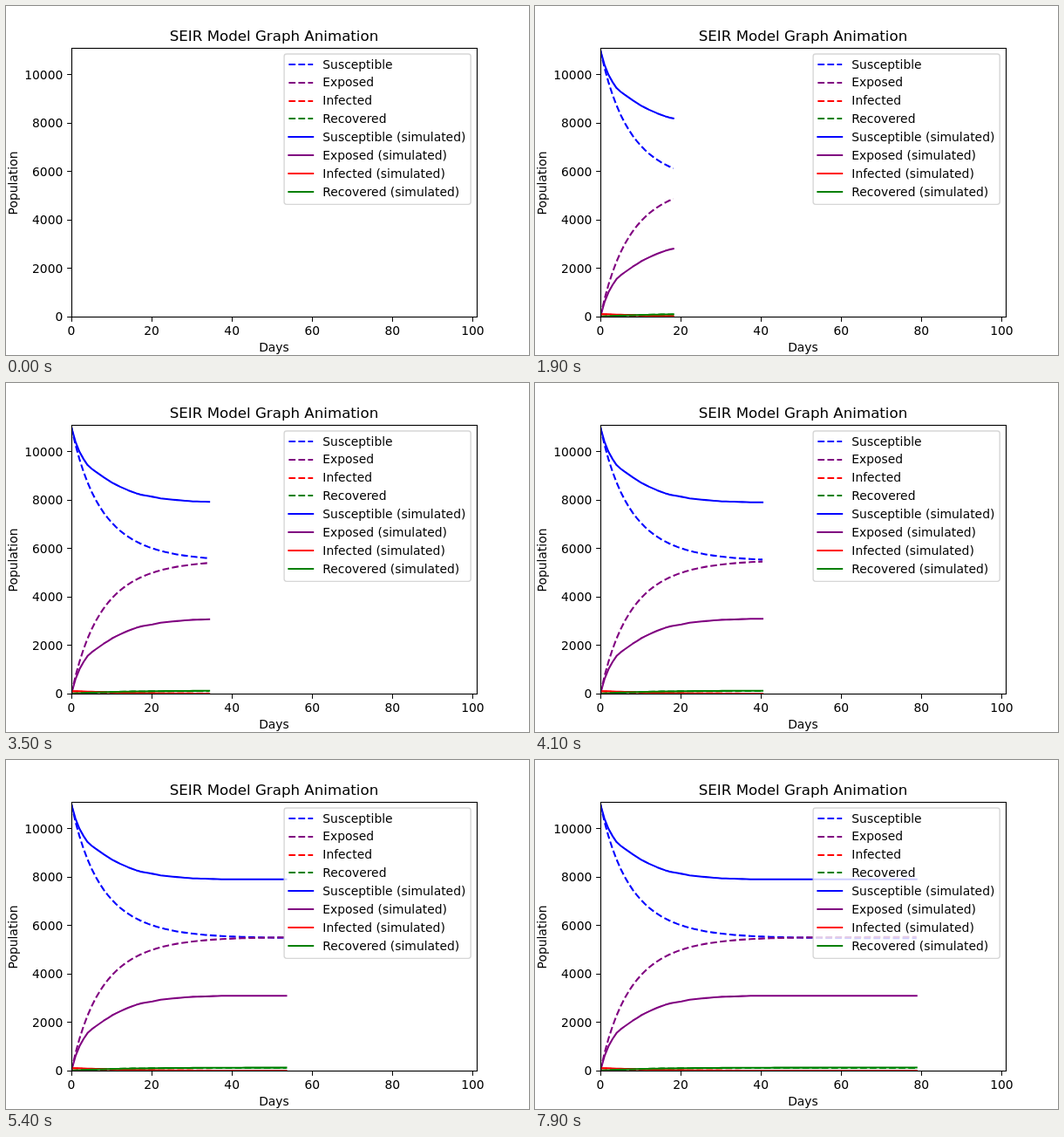
Recreate the animation shown at these times as an HTML page with a canvas. Size 600 px wide and 400 px high, loop 8000 ms.

```html
<!DOCTYPE html>
<html lang="en">
<head>
<meta charset="utf-8">
<title>SEIR Model Graph Animation</title>
<style>
  html, body { margin: 0; width: 100%; height: 100%; overflow: hidden; background: #fff; }
  canvas { display: block; width: 600px; height: 400px; }
</style>
</head>
<body>
<canvas id="stage" width="600" height="400"></canvas>
<script>
const ctx = document.getElementById('stage').getContext('2d');

const LOOP = 8000, STEP = 100;
const DAYS = 101, PEOPLE = 11100;
const POINT = 100 / 99; // 100 samples spread over 100 days
const BOX = { left: 75, top: 48, right: 540, bottom: 356 };
const FONT = '"DejaVu Sans", sans-serif';
const DASH = [7.708, 3.333];
const LINE = 2.083;

const xOf = day => BOX.left + day * (BOX.right - BOX.left) / DAYS;
const yOf = count => BOX.bottom - count * (BOX.bottom - BOX.top) / PEOPLE;

// Simulated loss of susceptibles: [day, people]
const LOSS = [
  [0, 0], [1, 590], [2, 1010], [3, 1310], [4, 1560], [5, 1710], [6, 1835],
  [8, 2070], [10, 2285], [12, 2455], [14, 2600], [16, 2725], [17, 2778],
  [18, 2810], [20, 2868], [22, 2935], [25, 2990], [27, 3020], [30, 3060],
  [34, 3078], [37, 3098], [99, 3100]
];

function lossAt(i) {
  const k = LOSS.findIndex(p => p[0] >= i);
  if (k === 0) return 0;
  const [i0, v0] = LOSS[k - 1], [i1, v1] = LOSS[k];
  return v0 + (v1 - v0) * (i - i0) / (i1 - i0);
}

const healed = day => 1 - Math.exp(-0.1 * day);
const susceptible = day => 11000 * Math.exp(-0.699 * healed(day));

const series = [
  { name: 'Susceptible', color: '#0000ff', dash: DASH, value: susceptible },
  { name: 'Exposed', color: '#800080', dash: DASH,
    value: d => 11000 - susceptible(d) - 10 * healed(d) },
  { name: 'Infected', color: '#ff0000', dash: DASH, value: d => 100 * (1 - healed(d)) },
  { name: 'Recovered', color: '#008000', dash: DASH, value: d => 110 * healed(d) },
  { name: 'Susceptible (simulated)', color: '#0000ff', dash: [],
    value: (d, i) => 11000 - lossAt(i) },
  { name: 'Exposed (simulated)', color: '#800080', dash: [],
    value: (d, i) => lossAt(i) * 0.997 },
  { name: 'Infected (simulated)', color: '#ff0000', dash: [],
    value: d => 100 * Math.exp(-Math.pow(d / 13, 1.5)) },
  { name: 'Recovered (simulated)', color: '#008000', dash: [],
    value: d => 125 * (1 - Math.exp(-0.075 * d)) }
];

function text(str, x, y, size = 13.889, align = 'center') {
  ctx.font = `${size}px ${FONT}`;
  ctx.textAlign = align;
  ctx.fillStyle = '#000';
  ctx.fillText(str, x, y);
}

function setPen(s, width) {
  ctx.strokeStyle = s.color;
  ctx.lineWidth = width;
  ctx.lineJoin = 'round';
  ctx.lineCap = s.dash.length ? 'butt' : 'square';
  ctx.setLineDash(s.dash);
}

function drawCurves(last) {
  if (last < 1) return;
  ctx.save();
  ctx.beginPath();
  ctx.rect(BOX.left, BOX.top, BOX.right - BOX.left, BOX.bottom - BOX.top);
  ctx.clip();
  for (const s of series) {
    setPen(s, LINE);
    ctx.beginPath();
    for (let i = 0; i <= last; i++) {
      const day = i * POINT;
      ctx.lineTo(xOf(day), yOf(s.value(day, i)));
    }
    ctx.stroke();
  }
  ctx.restore();
}

function drawAxes() {
  const { left, top, right, bottom } = BOX;
  ctx.fillStyle = '#000';
  for (let d = 0; d <= 100; d += 20) ctx.fillRect(Math.floor(xOf(d)), bottom + 1, 1, 4.86);
  for (let p = 0; p <= 10000; p += 2000) ctx.fillRect(left - 4.86, Math.floor(yOf(p)), 4.86, 1);
  ctx.strokeStyle = '#000';
  ctx.lineWidth = 1.11;
  ctx.strokeRect(left + 0.5, top + 0.5, right - left, bottom - top);

  for (let d = 0; d <= 100; d += 20) text(d, xOf(d), 377);
  for (let p = 0; p <= 10000; p += 2000) text(p, 65.3, Math.round(yOf(p) + 5.2), 13.889, 'right');
  text('SEIR Model Graph Animation', 307.5, 40, 16.667);
  text('Days', 307.5, 396);

  ctx.save();
  ctx.translate(13, 203);
  ctx.rotate(-Math.PI / 2);
  text('Population', 0, 0);
  ctx.restore();
}

function drawLegend() {
  ctx.beginPath();
  ctx.roundRect(319.1, 55, 214.1, 172.4, 2.78);
  ctx.fillStyle = 'rgba(255,255,255,0.8)';
  ctx.fill();
  ctx.strokeStyle = 'rgba(204,204,204,0.8)';
  ctx.lineWidth = 1.39;
  ctx.stroke();

  series.forEach((s, i) => {
    const y = Math.round(66.7 + 20.9 * i);
    ctx.save();
    setPen(s, 2);
    ctx.beginPath();
    ctx.moveTo(324.4, y);
    ctx.lineTo(352.2, y);
    ctx.stroke();
    ctx.restore();
    text(s.name, 363.3, Math.round(71.5 + 20.98 * i), 13.889, 'left');
  });
}

function draw() {
  const t = performance.now() % LOOP;
  ctx.fillStyle = '#fff';
  ctx.fillRect(0, 0, 600, 400);
  drawCurves(Math.floor(t / STEP) - 1);
  drawAxes();
  drawLegend();
  requestAnimationFrame(draw);
}
draw();
</script>
</body>
</html>
```
